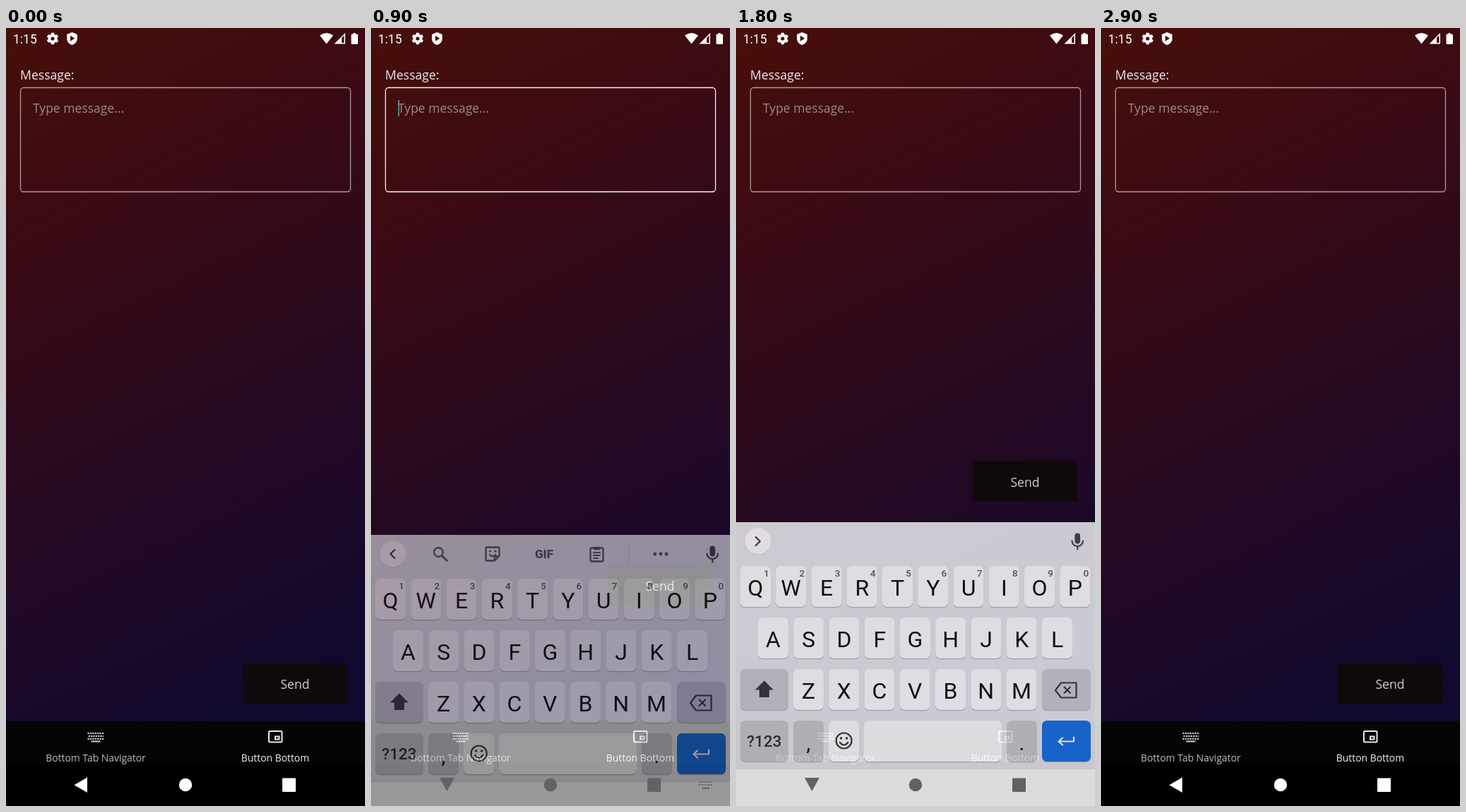
An HTML page for the animation above (3000 ms loop, 508 px wide and 1102 px high).

```html
<!DOCTYPE html>
<html lang="en">
<head>
<meta charset="utf-8">
<title>Message form</title>
<style>
html, body { margin: 0; width: 100%; height: 100%; overflow: hidden; background: #000; }
svg { display: block; width: 100vw; height: 100vh; }
text { font-family: "Open Sans", sans-serif; fill: #fff; }
.keys text, .clock { font-family: Roboto, sans-serif; }
.mid text, .mid { text-anchor: middle; }
.line { fill: none; stroke-linecap: round; stroke-linejoin: round; }
</style>
</head>
<body>
<svg viewBox="0 0 508 1102" preserveAspectRatio="none">
  <defs>
    <linearGradient id="bg" gradientUnits="userSpaceOnUse" x1="0" y1="0" x2="486" y2="1000">
      <stop offset="0" stop-color="#470f0a"/>
      <stop offset=".25" stop-color="#3b0a12"/>
      <stop offset=".45" stop-color="#2d0a1b"/>
      <stop offset=".7" stop-color="#1e0926"/>
      <stop offset=".9" stop-color="#11082e"/>
      <stop offset="1" stop-color="#0f0830"/>
    </linearGradient>
  </defs>
  <rect width="508" height="1102" fill="url(#bg)"/>

  <!-- status bar -->
  <text class="clock" x="10" y="21.5" font-size="17.5">1:15</text>
  <g fill="#fff">
    <g transform="translate(66 15)">
      <circle r="4.6" fill="none" stroke="#fff" stroke-width="4"/>
      <g id="cog"></g>
    </g>
    <path fill-rule="evenodd" d="M93.500 6l7.300 3v6c0 4.500-3 7.800-7.300 9-4.300-1.200-7.300-4.500-7.300-9V9zM91 10.800v8l6.300-4z"/>
    <path d="M444 10.500Q453.500 3.500 463 10.500L453.500 22.500z"/>
    <path fill-rule="evenodd" d="M464.500 22.500L480 7v15.500zM475 14v7h3.500V10.500z"/>
    <path d="M491.500 7h3v1.500h2q1.500 0 1.500 1.500v11.500q0 1.500-1.500 1.500h-6.500q-1.500 0-1.500-1.500V10q0-1.500 1.500-1.500h1.500z"/>
  </g>

  <!-- form -->
  <text x="20" y="73" font-size="17.6" opacity=".9">Message:</text>
  <rect id="box" x="20.500" y="84.500" width="467" height="147.500" rx="4.500" fill="none" stroke="#fff" stroke-width="1.300"/>
  <text x="38" y="120" font-size="17.500" opacity=".5">Type message...</text>
  <rect id="caret" x="38.300" y="102" width="1.900" height="23" fill="#5f8a98"/>

  <!-- tab bar -->
  <rect y="982" width="508" height="62" fill="#050406"/>
  <g class="mid" font-size="13.900">
    <text x="127" y="1039" opacity=".72">Bottom Tab Navigator</text>
    <text x="381" y="1039" opacity=".94">Button Bottom</text>
  </g>
  <g fill="none" stroke="#d0d0d0">
    <path stroke-width="2.200" stroke-dasharray="2.300 1.100" d="M115.500 999h23.500M116.500 1003h21.500M115.500 1007h23.500"/>
    <path stroke-width="2" d="M120.500 1010.500h13"/>
    <rect x="372" y="996" width="18.500" height="15.500" rx="1.500" stroke="#e8e8e8" stroke-width="2"/>
    <rect x="381" y="1003.500" width="5.500" height="4" stroke="#e8e8e8" stroke-width="2"/>
  </g>
  <rect y="1043" width="508" height="59"/>

  <g id="send">
    <rect x="335" width="148" height="58" fill="#10090c"/>
    <text class="mid" x="409" y="36.500" font-size="17.600" opacity=".8">Send</text>
  </g>

  <!-- on-screen keyboard -->
  <g id="kb" class="keys">
    <rect y="694" width="508" height="420" fill="#e6e7ed"/>
    <rect y="1043" width="508" height="70" fill="#fdfdfd"/>
    <rect y="1043" width="508" height="1" fill="#dcdde2"/>
    <circle cx="31" cy="721.600" r="19" fill="#d3d4d9"/>
    <circle cx="31" cy="720.800" r="18.700" fill="#fdfdfe"/>
    <path id="chevron" class="line" stroke="#444" stroke-width="2.300"/>
    <g id="tools">
      <g class="line" stroke="#56585c" stroke-width="2.300">
        <circle cx="95.500" cy="718.500" r="6.300"/>
        <path d="M100.500 723.500l7 7" stroke-width="2.800"/>
        <path d="M164 711.500h16q1.500 0 1.500 1.500v11l-6.500 6.500h-11q-1.500 0-1.500-1.500v-16q0-1.500 1.500-1.500zM175 730v-5.500h6M168 722q4 4.500 8 0"/>
        <path d="M168.500 717v.1M176 717v.1" stroke-width="3"/>
        <rect x="310.500" y="712.500" width="18" height="19" rx="1.500"/>
        <path d="M315 719h9M315 723h9M315 727h6" stroke-width="1.900"/>
        <path d="M316.500 713h6" stroke-width="4.500"/>
      </g>
      <text x="245" y="727" class="mid" font-size="17" font-weight="900" style="fill:#56585c">GIF</text>
      <rect x="364" y="708" width="1" height="27" fill="#cacbd0"/>
      <path class="line" stroke="#56585c" stroke-width="4.800" d="M401.800 721h.1M410 721h.1M418 721h.1"/>
    </g>
    <g class="line" stroke="#44464a" stroke-width="2.200">
      <rect x="480.500" y="710.500" width="5.500" height="13" rx="2.700" fill="#44464a"/>
      <path d="M475.500 720.500c0 10 15.500 10 15.500 0M483.300 728.500v4"/>
    </g>
    <g id="keys" class="mid"></g>
    <path d="M40 918.500l13 13h-6v10.500H33V931.500h-6z" fill="#3a3b3f"/>
    <g class="line" stroke="#3a3b3f" stroke-width="2.200">
      <path d="M460 921.500h21.500v21H460l-8-10.500zM464.500 927.500l8.500 8.500M473 927.500l-8.500 8.500"/>
      <circle cx="152.700" cy="1003.500" r="11"/>
      <path d="M147 1006q5.700 7 11.400 0"/>
      <path d="M148.700 1000v.1M156.700 1000v.1" stroke-width="3.500"/>
      <path d="M478 998.500v6h-21M462 999.500l-5.500 5 5.500 5" stroke="#fff"/>
    </g>
  </g>

  <!-- system navigation -->
  <g id="nav">
    <path id="back"/>
    <circle cx="254" cy="1072" r="9.200"/>
    <rect x="391" y="1062.500" width="19" height="19.500" rx="1"/>
    <g id="ime" fill="none">
      <path stroke-width="2.200" stroke-dasharray="2.200 1.900" d="M464 1068h20M464 1072h20"/>
      <path stroke-width="2" d="M468.500 1076.800h10.500"/>
    </g>
  </g>
</svg>
<script>
const $ = id => document.getElementById(id);
const PERIOD = 3000, STEP = 100;
const DARK = "#c9cad0", LIGHT = "#fdfdfe", BLUE = "#1b72e6";

const key = (x, y, w, fill = LIGHT, label = "", size = 32, base = 42) =>
  `<rect x="${x}" y="${y + 1.3}" width="${w}" height="58" rx="7" fill="#b4b5ba"/>
   <rect x="${x}" y="${y}" width="${w}" height="58" rx="7" fill="${fill}"/>
   <text x="${x + w / 2}" y="${y + base}" font-size="${size}" style="fill:#111">${label}</text>`;

function buildKeys() {
  const pitch = 50.25;
  let out = "";
  [["QWERTYUIOP", 6], ["ASDFGHJKL", 31], ["ZXCVBNM", 81]].forEach(([row, left], r) => {
    [...row].forEach((c, i) => {
      const x = left + i * pitch;
      out += key(x, 756 + r * 73, 43, LIGHT, c);
      if (!r) out += `<text x="${x + 37}" y="771" font-size="13.5" font-weight="500" style="fill:#5a5b60">${(i + 1) % 10}</text>`;
    });
  });
  out += key(6, 902, 68, DARK) + key(433, 902, 69, DARK);
  out += key(6, 975, 68, DARK, `<tspan fill="#333" font-weight="500">?123</tspan>`, 22.5, 37);
  out += key(81, 975, 43, DARK, ",", 30) + key(131, 975, 43) + key(181, 975, 195);
  out += key(383, 975, 43, DARK, ".", 30) + key(433, 975, 69, BLUE);
  $("keys").innerHTML = out;
}

function buildCog() {
  for (let a = 0; a < 360; a += 60)
    $("cog").innerHTML += `<rect x="-2.2" y="-8.2" width="4.4" height="4" rx=".6" transform="rotate(${a})"/>`;
}

// start, focused, keyboard shift, keyboard alpha, button top, keyboard switcher
const steps = [
  [0, 0, 0, 0, 899.5, 0],
  [800, 1, 0, 0, 899.5, 1],
  [900, 1, 24, .6, 760, 1],
  [1000, 1, 0, 1, 616.5, 1],
  [1100, 1, 0, 1, 613, 1],
  [1800, 0, 6, .87, 613, 0],
  [1900, 0, 24, .3, 760, 0],
  [2000, 0, 0, 0, 896, 0],
  [2100, 0, 0, 0, 899.5, 0]
];

function draw(time) {
  const t = Math.floor(time % PERIOD / STEP) * STEP;
  const [, focus, shift, alpha, top, ime] = steps.filter(s => s[0] <= t).pop();
  const blink = focus && (t - 800) % 1000 < 500;
  const open = alpha > .5;

  $("box").setAttribute("stroke-opacity", focus ? .95 : .58);
  $("caret").setAttribute("opacity", blink ? 1 : 0);
  $("send").setAttribute("transform", `translate(0 ${top})`);
  $("kb").setAttribute("transform", `translate(0 ${shift})`);
  $("kb").setAttribute("opacity", alpha);
  $("tools").setAttribute("opacity", focus);
  $("chevron").setAttribute("d", focus ? "M33.500 715l-6 6 6 6" : "M28 715l6 6-6 6");

  const color = open ? "#626264" : "#fff";
  $("nav").setAttribute("fill", color);
  $("ime").setAttribute("stroke", color);
  $("ime").setAttribute("opacity", ime);
  $("back").setAttribute("d", open ? "M97 1062h21l-10.500 19z" : "M115 1061.500v21.500l-18.500-10.700z");
}

buildKeys();
buildCog();
const start = performance.now();
function tick() {
  draw(performance.now() - start);
  requestAnimationFrame(tick);
}
tick();
</script>
</body>
</html>
```
